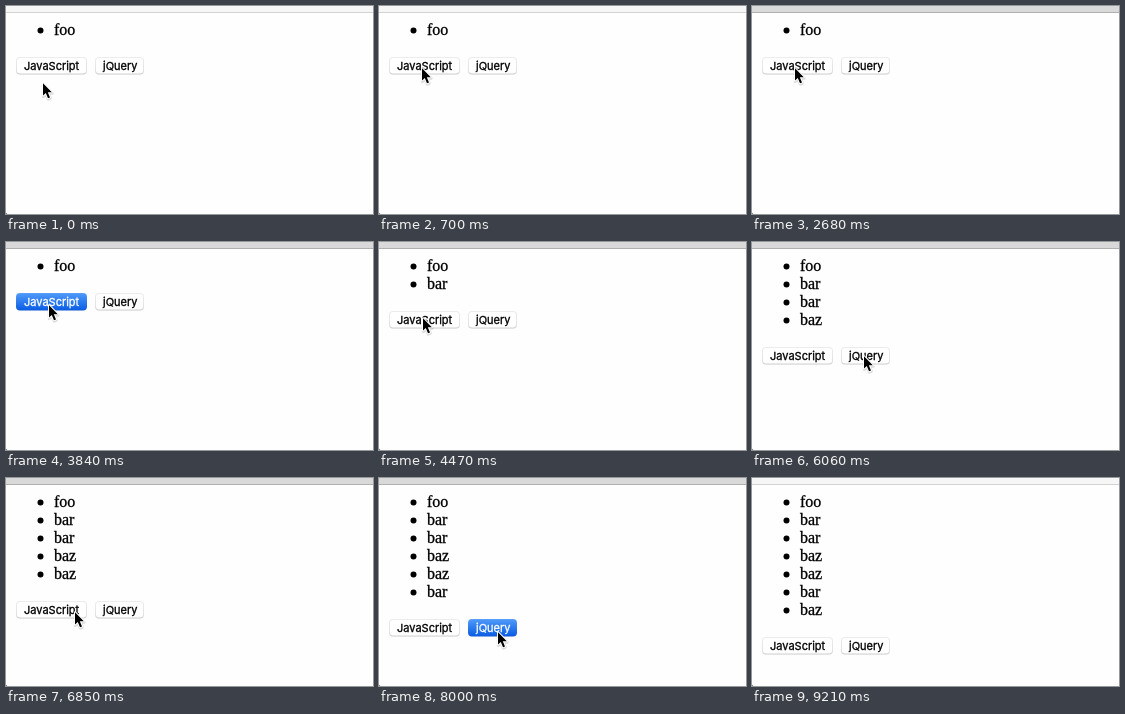
These frames come from a looping animation (367x208 px, 9310 ms). An HTML page:

```html
<!DOCTYPE html>
<html lang="en">
<head>
<meta charset="utf-8">
<title>List buttons</title>
<style>
  html, body { margin: 0; width: 100%; height: 100%; overflow: hidden; background: #fefefe; }
  svg { display: block; width: 367px; height: 208px; }
  text { fill: #000; stroke: #000; stroke-width: .3px; }
  .item { font: 16px "Liberation Serif", serif; }
  .button { font: 11px Inter, sans-serif; }
  .rim { fill: url(#rim); }
  .face { fill: #fff; }
  .pressed .rim { fill: url(#blueRim); }
  .pressed .face { fill: url(#blue); }
  .pressed text { fill: #fff; stroke: #fff; }
  #bar { fill: #f6f6f6; }
  #edge { fill: #d2d2d2; }
  .active #bar { fill: #d9d9d9; }
  .active #edge { fill: #b0b0b0; }
</style>
</head>
<body>
<svg id="stage" viewBox="0 0 367 208">
  <defs>
    <linearGradient id="rim" x2="0" y2="1">
      <stop offset="0" stop-color="#ececec"/>
      <stop offset=".8" stop-color="#e2e2e2"/>
      <stop offset="1" stop-color="#c8c8c8"/>
    </linearGradient>
    <linearGradient id="blue" x2="0" y2="1">
      <stop offset="0" stop-color="#4c97f8"/>
      <stop offset="1" stop-color="#0c60e6"/>
    </linearGradient>
    <linearGradient id="blueRim" x2="0" y2="1">
      <stop offset="0" stop-color="#5a9ff8"/>
      <stop offset="1" stop-color="#1158d4"/>
    </linearGradient>
  </defs>
  <rect width="367" height="208" fill="#fefefe"/>
  <rect id="bar" width="367" height="6"/>
  <rect id="edge" y="6" width="367" height="1"/>
  <path d="M0 206.5Q.3 207.7 1.5 208H0z" fill="#444"/>
  <g id="list"></g>
  <g id="buttons">
    <g class="button">
      <rect class="rim" x="10" y="51" width="71" height="17.5" rx="4"/>
      <rect class="face" x="11" y="52" width="69" height="15.5" rx="3"/>
      <text x="18" y="64">JavaScript</text>
    </g>
    <g class="button">
      <rect class="rim" x="89" y="51" width="49" height="17.5" rx="4"/>
      <rect class="face" x="90" y="52" width="47" height="15.5" rx="3"/>
      <text x="97" y="64">jQuery</text>
    </g>
  </g>
  <g id="cursor" stroke-linejoin="round">
    <path id="arrow" d="M1 1.2V13.6L3.8 11L6 16.2L8 15.4L5.8 10.2H9.8z" transform="translate(.3 1)"
          fill="none" stroke="#000" stroke-opacity=".14" stroke-width="3"/>
    <path d="M1 1.2V13.6L3.8 11L6 16.2L8 15.4L5.8 10.2H9.8z"
          stroke="#fff" stroke-width="2" paint-order="stroke"/>
  </g>
</svg>
<script>
  const LOOP = 9310, TICK = 88.5, ROW = 18;
  const JS = 0, JQUERY = 1, WORDS = ['bar', 'baz'];
  const $ = id => document.getElementById(id);

  const glides = [], clicks = [];
  const glide = (start, end, x, y) => glides.push({ start, end, x, y });
  const click = (press, release, button) => clicks.push({ press, release, button });

  glide(440, 700, 42, 61);
  glide(3300, 3390, 42, 51);
  glide(3570, 3570, 42, 62);
  click(3840, 3930, JS);
  glide(4290, 4640, 43, 77);
  click(4730, 4910, JS);
  glide(5090, 5530, 107, 98);
  click(5620, 5800, JQUERY);
  glide(5890, 6150, 112, 118);
  click(6320, 6500, JQUERY);
  glide(6670, 7020, 60, 136);
  click(7110, 7290, JS);
  glide(7560, 7820, 133, 151);
  glide(7910, 7910, 118, 153);
  click(8000, 8080, JQUERY);
  glide(8350, 8610, 253, 200);

  const words = ['foo', ...clicks.map(c => WORDS[c.button])];
  $('list').innerHTML = words.map((word, i) =>
    `<g class="item" transform="translate(0 ${i * ROW})">
       <circle cx="34.5" cy="24.5" r="3"/><text x="48" y="29">${word}</text>
     </g>`).join('');
  const items = [...$('list').children];
  const buttons = [...$('buttons').children];

  // Each glide eases out in whole ticks, the first one at its start.
  function cursorAt(t) {
    let x = 36, y = 76;
    for (const g of glides.filter(g => t >= g.start)) {
      const steps = Math.round((g.end - g.start) / TICK) + 1;
      const step = Math.floor((t - g.start + 5) / TICK) + 1;
      const p = Math.min(1, step / steps), eased = p * (2 - p);
      x += (g.x - x) * eased;
      y += (g.y - y) * eased;
    }
    return [Math.round(x), Math.round(y)];
  }

  const show = (el, on) => el.style.display = on ? '' : 'none';

  function draw(t) {
    const added = clicks.filter(c => t >= c.release).length;
    const held = clicks.find(c => t >= c.press && t < c.release);
    items.forEach((item, i) => show(item, i <= added));
    buttons.forEach((b, i) => b.classList.toggle('pressed', held?.button === i));
    $('buttons').setAttribute('transform', `translate(0 ${added * ROW})`);
    $('cursor').setAttribute('transform', `translate(${cursorAt(t)})`);
    show($('cursor'), t < 8700);
    $('stage').classList.toggle('active', t >= 2680 && t < 9210);
  }

  function tick() {
    draw(performance.now() % LOOP);
    requestAnimationFrame(tick);
  }
  tick();
</script>
</body>
</html>
```
